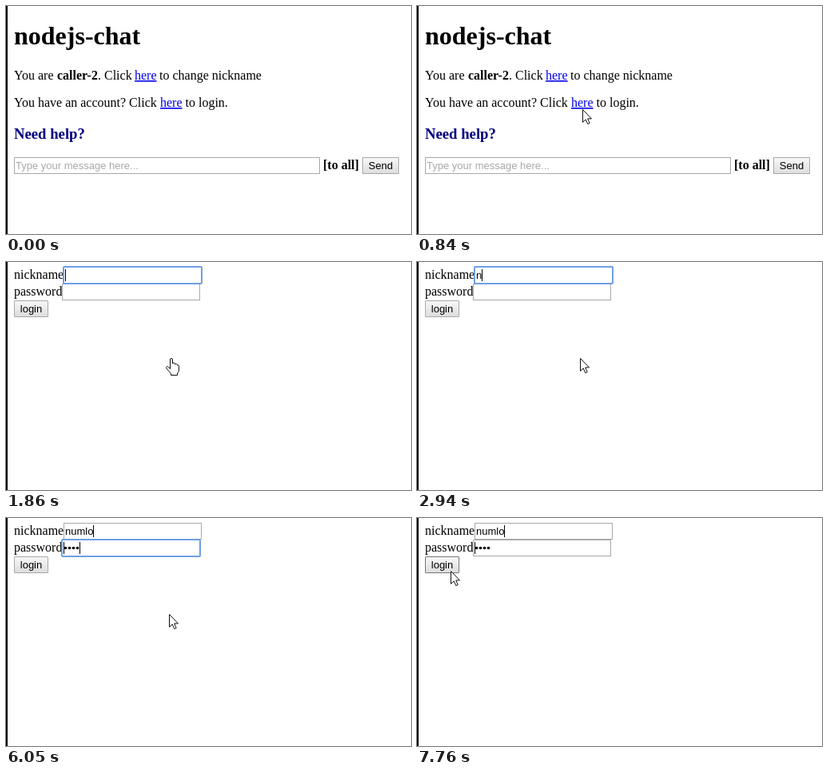
Animation of 507x285 px, one loop 8 s. Source, as an HTML page:

```html
<!DOCTYPE html>
<html lang="en">
<head>
<meta charset="utf-8">
<title>Chat login</title>
<style>
  html, body { margin: 0; width: 100%; height: 100%; overflow: hidden; background: #fff; }
  svg { display: block; width: 507px; height: 285px; }
  text { font: 16px "Liberation Serif", "Times New Roman", serif; fill: #000; }
  .bold { font-weight: bold; }
  .title { font-size: 32px; }
  .help { font-size: 18.72px; fill: #000080; }
  .ui { font: 13px "Liberation Sans", Arial, sans-serif; }
  .hint { fill: #a9a9a9; }
  .link { fill: #0000ee; text-decoration: underline; }
  .mid { text-anchor: middle; }
  .field { fill: #fff; stroke: #a9a9a9; }
  .button { fill: url(#face); stroke: #a9a9a9; }
  .ring { fill: none; stroke: #6f9fe4; stroke-width: 2; }
  .pointer { fill: #fff; stroke: #111; stroke-linejoin: round; }
</style>
</head>
<body>
<svg viewBox="0 0 507 285">
  <defs>
    <linearGradient id="face" x2="0" y2="1">
      <stop stop-color="#f8f8f8"/><stop offset="1" stop-color="#dddddd"/>
    </linearGradient>
    <linearGradient id="pressed" x2="0" y2="1">
      <stop stop-color="#dddddd"/><stop offset="1" stop-color="#f4f4f4"/>
    </linearGradient>
  </defs>
  <rect width="507" height="285" fill="#fff"/>

  <g id="chat">
    <text class="bold title" x="10" y="48">nodejs-chat</text>
    <text x="10" y="92">You are</text>
    <text class="bold" x="64" y="92">caller-2</text>
    <text x="115" y="92">. Click</text>
    <text class="link" x="161" y="92">here</text>
    <text x="192" y="92">to change nickname</text>
    <text x="10" y="126">You have an account? Click</text>
    <text class="link" id="loginLink" x="193" y="126">here</text>
    <text x="224.5" y="126">to login.</text>
    <text class="bold help" x="10" y="166">Need help?</text>
    <rect class="field" x="10.5" y="189.5" width="382" height="20"/>
    <text class="ui hint" x="12" y="204">Type your message here...</text>
    <text class="bold" x="397" y="204">[to all]</text>
    <rect class="button" x="446.5" y="189.5" width="45" height="20"/>
    <text class="ui mid" x="469" y="204">Send</text>
  </g>

  <g id="login">
    <text x="10" y="21">nickname</text>
    <text x="10" y="42">password</text>
    <rect class="field" x="72.5" y="6.5" width="172" height="20"/>
    <rect class="field" x="70.5" y="27.5" width="172" height="20"/>
    <rect class="ring" id="nameRing" x="72" y="6" width="173" height="21" rx="1"/>
    <rect class="ring" id="passRing" x="70" y="27" width="173" height="21" rx="1"/>
    <text class="ui" id="nick" x="74" y="21"></text>
    <rect id="nameCaret" y="9" width="1" height="15"/>
    <g id="dots"></g>
    <rect id="startCaret" x="72" y="30" width="1" height="15"/>
    <rect id="passCaret" y="30" width="1" height="15"/>
    <rect class="button" id="submit" x="10.5" y="48.5" width="42" height="20" rx="0.5"/>
    <text class="ui mid" x="31.5" y="63">login</text>
  </g>

  <rect width="2" height="285"/>
  <path class="pointer" id="arrow" d="M.5 .5V16.3L4.2 12.9L6.8 18.6L9.2 17.5L6.7 11.9H11.5Z"/>
  <path class="pointer" id="hand" d="M5.5 13.5V2Q5.5 .5 7 .5T8.5 2V7Q9 5.7 10.3 6T11.5 8Q12.3 6.8 13.4 7.3T14.4 9Q16.5 8.2 16.5 10.5V15Q16.5 17.5 14.5 19V21.5H6.5V19.5L.9 13Q0 11.3 1.5 10.7T4 12Z"/>
</svg>
<script>
  const LOOP = 8000;
  const NICK = "numlo";
  const nickTimes = [2940, 3090, 3410, 3640, 3860];
  const nickCarets = [74, 81, 88, 99, 102, 109];
  const passTimes = [5270, 5570, 5800, 6050];

  // Sampled pointer positions: time, x, y
  const moves = [
    [380, 345, 257], [460, 322, 238], [530, 295, 213], [610, 267, 187],
    [690, 241, 163], [760, 221, 143], [840, 207, 129], [920, 205, 123],
    [1000, 204, 121], [1070, 204, 120],
    [6750, 198, 116], [6820, 188, 110], [6990, 171, 102], [7070, 149, 91],
    [7140, 125, 81], [7220, 94, 74], [7300, 65, 69], [7370, 47, 67], [7450, 42, 66]
  ];

  const el = Object.fromEntries(
    [...document.querySelectorAll("[id]")].map(node => [node.id, node]));
  const show = (node, on) => { node.style.display = on ? "" : "none"; };
  const within = (t, a, b) => t >= a && t < b;
  const countPast = (times, t) => times.filter(time => t >= time).length;

  const dots = passTimes.map((_, i) => {
    const dot = document.createElementNS("http://www.w3.org/2000/svg", "circle");
    dot.setAttribute("cx", 74.5 + 5 * i);
    dot.setAttribute("cy", 37.5);
    dot.setAttribute("r", 1.8);
    return el.dots.appendChild(dot);
  });

  function drawPointer(t) {
    const move = moves.filter(m => t >= m[0]).pop();
    const overLink = within(t, 920, 1760) || within(t, 1860, 2230);
    show(el.arrow, move && !overLink);
    show(el.hand, move && overLink);
    if (!move) return;
    const [, x, y] = move;
    el.arrow.setAttribute("transform", `translate(${x} ${y})`);
    el.hand.setAttribute("transform", `translate(${x - 4} ${y})`);
  }

  function drawForm(t) {
    const typed = countPast(nickTimes, t);
    const secret = countPast(passTimes, t);
    const inPassword = within(t, 4500, 7600);
    el.nick.textContent = NICK.slice(0, typed);
    el.nameCaret.setAttribute("x", nickCarets[typed]);
    el.passCaret.setAttribute("x", 72 + 5 * secret);
    show(el.nameRing, t < 4500);
    show(el.passRing, inPassword);
    show(el.passCaret, inPassword);
    show(el.startCaret, t >= 4500);
    dots.forEach((dot, i) => show(dot, i < secret));
    el.submit.style.stroke = t >= 7370 ? "#777" : "";
    el.submit.style.fill = within(t, 7600, 7760) ? "url(#pressed)" : "";
  }

  function draw(t) {
    show(el.chat, t < 1860);
    show(el.login, t >= 1860);
    el.loginLink.style.fill = t >= 1760 ? "#551a8b" : t >= 1680 ? "#ee0000" : "";
    drawForm(t);
    drawPointer(t);
  }

  const start = performance.now();
  function tick() {
    draw((performance.now() - start) % LOOP);
    requestAnimationFrame(tick);
  }
  tick();
</script>
</body>
</html>
```
